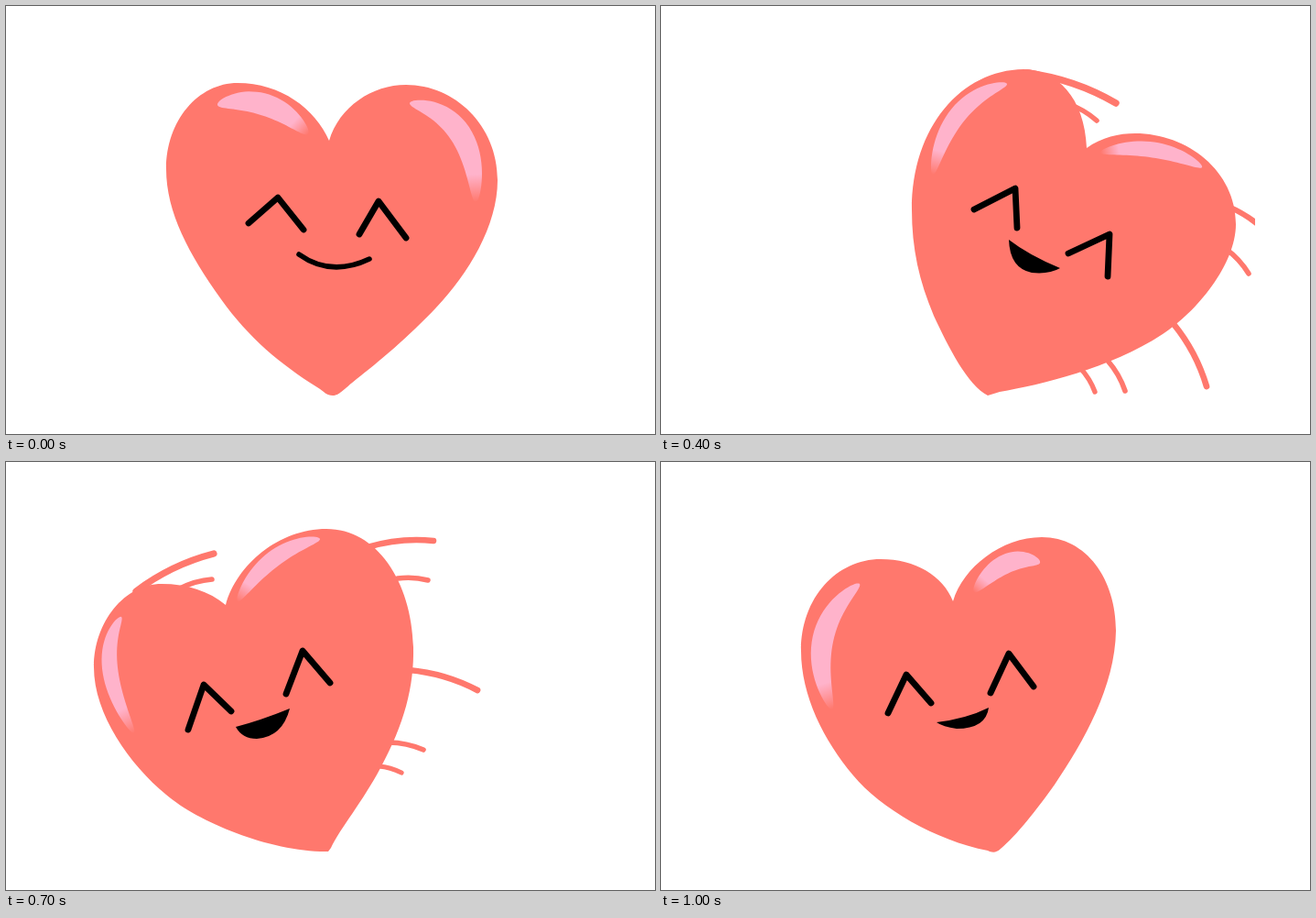
An HTML page with a canvas that plays this animation: 709 px wide and 467 px high, repeating every 1.1 s.

```html
<!DOCTYPE html>
<html lang="en">
<head>
<meta charset="utf-8">
<title>Swaying heart</title>
<style>
html, body { margin: 0; width: 100%; height: 100%; overflow: hidden; background: #fff; }
canvas { display: block; }
</style>
</head>
<body>
<canvas id="stage" width="709" height="467"></canvas>
<script>
const ctx = document.getElementById('stage').getContext('2d');
const RED = '#ff786d', PINK = '#ffb3cb', INK = '#000';
const STEP = 100;
const BEND = 0.1;

// shines: start, control, end, width. lines: the two ends of each speed line.
const front = {
  body: 'M353 147C364 110 400 86 437 86C490 86 537 130 537 190C537 240 505 292 470 329' +
    'C440 361 405 390 383 407C368 419 364 425 357 425C350 425 348 421 340 416' +
    'C300 391 265 362 235 320C200 271 175 225 175 178C175 125 210 84 253 84C300 84 338 112 353 147',
  shines: [[231, 108, 287, 92, 330, 140, 24], [441, 106, 515, 118, 513, 214, 24]],
  eyes: 'M265 237L297 209L325 244M386 249L407 213L437 253',
  smile: 'M320 271Q355 296 397 276'
};

const lean = {
  body: 'M319 152C330 115 372 82 416 82C465 82 497 128 497 184C496 245 462 305 430 352' +
    'C410 380 388 408 371 422C366 427 361 426 357 424C300 413 240 378 210 342' +
    'C178 304 153 255 153 206C153 148 192 106 240 106C278 106 308 124 319 152',
  shines: [[217, 133, 152, 184, 187, 270, 23], [414, 110, 376, 96, 342, 142, 21]],
  eyes: 'M248 274L268 232L295 263M360 252L380 209L407 245',
  mouth: 'M301 284Q334 280 358 268Q355 291 323 291Q308 289 301 284'
};

const tilt = {
  body: 'M470 156C488 141 512 133 540 133C580 133 614 174 614 224C614 275 575 330 535 363' +
    'C500 393 420 426 358 425L355 421C345 400 320 370 301 334C275 286 264 245 265 202' +
    'C267 130 305 73 360 73C412 73 458 112 470 156',
  shines: [[367, 84, 424, 94, 457, 152, 18], [584, 169, 616, 217, 570, 296, 17]],
  eyes: 'M356 241L386 206L404 253M464 272L494 243L511 292',
  mouth: 'M400 269Q432 282 459 289Q452 302 436 302Q408 300 400 269',
  lines: [
    [243, 86, 315, 93], [249, 129, 282, 127], [195, 249, 270, 227], [254, 314, 292, 306],
    [278, 339, 303, 332], [483, 100, 568, 141], [485, 128, 520, 138]
  ]
};

const sway = {
  body: 'M465 155C482 143 500 139 518 139C575 139 628 180 628 238C628 282 585 334 548 358' +
    'C490 396 415 413 370 421L357 425C335 414 314 372 298 338C282 300 274 265 274 222' +
    'C274 132 328 70 396 69C432 69 463 100 465 155',
  shines: [[378, 85, 312, 102, 297, 184, 19], [591, 176, 540, 146, 480, 160, 17]],
  eyes: 'M342 222L387 199L389 242M445 270L490 249L488 295',
  mouth: 'M380 255Q402 272 436 286Q424 293 405 291Q381 286 380 255',
  lines: [
    [400, 73, 497, 106], [445, 107, 476, 125], [620, 219, 665, 250], [617, 265, 642, 292],
    [560, 347, 596, 415], [458, 395, 474, 421], [488, 387, 507, 420]
  ]
};

// Pose, sum of an x and its mirrored x (0 = not mirrored), speed lines shown
const steps = [
  [front, 0], [lean, 710], [tilt, 0, true], [sway, 0], [sway, 0, true], [lean, 0],
  [front, 0], [tilt, 710, true], [sway, 712], [sway, 712, true], [lean, 0]
];

function fill(path, color) {
  ctx.fillStyle = color;
  ctx.fill(new Path2D(path));
}

function stroke(path, color, width) {
  ctx.strokeStyle = color;
  ctx.lineWidth = width;
  ctx.stroke(new Path2D(path));
}

function speedLine([x0, y0, x1, y1]) {
  const dx = x1 - x0, dy = y1 - y0;
  const cx = (x0 + x1) / 2 + dy * BEND, cy = (y0 + y1) / 2 - dx * BEND;
  stroke(`M${x0} ${y0}Q${cx} ${cy} ${x1} ${y1}`, RED, 4.5 + Math.hypot(dx, dy) / 35);
}

// A ribbon along a quadratic curve, widest in the middle and fading out at its end.
function shine([x0, y0, cx, cy, x1, y1, width]) {
  const quad = (a, c, b, t) => (1 - t) ** 2 * a + 2 * t * (1 - t) * c + t * t * b;
  const slope = (a, c, b, t) => (1 - t) * (c - a) + t * (b - c);
  const edge = (t, side) => {
    const dx = slope(x0, cx, x1, t), dy = slope(y0, cy, y1, t);
    const k = side * width / 2 * Math.sin(Math.PI * t) ** 0.5 / Math.hypot(dx, dy);
    return [quad(x0, cx, x1, t) - dy * k, quad(y0, cy, y1, t) + dx * k];
  };
  const ts = Array.from({ length: 41 }, (_, i) => (1 - Math.cos(Math.PI * i / 40)) / 2);
  const outline = [...ts.map(t => edge(t, 1)), ...ts.reverse().map(t => edge(t, -1))];
  const fade = ctx.createLinearGradient(x1, y1, quad(x0, cx, x1, 0.83), quad(y0, cy, y1, 0.83));
  fade.addColorStop(0, PINK + '00');
  fade.addColorStop(1, PINK);
  fill('M' + outline.map(p => p.map(v => v.toFixed(2)).join(' ')).join('L') + 'Z', fade);
}

function draw([pose, flip, moving]) {
  ctx.setTransform(1, 0, 0, 1, 0, 0);
  ctx.clearRect(0, 0, 709, 467);
  if (flip) ctx.setTransform(-1, 0, 0, 1, flip, 0);
  ctx.lineCap = ctx.lineJoin = 'round';

  if (moving) {
    ctx.save();
    ctx.beginPath();
    ctx.rect(0, 0, 649, 467);
    ctx.clip();
    pose.lines.forEach(speedLine);
    ctx.restore();
  }
  fill(pose.body, RED);
  pose.shines.forEach(shine);
  stroke(pose.eyes, INK, 6.8);
  if (pose.smile) stroke(pose.smile, INK, 5.5);
  if (pose.mouth) fill(pose.mouth, INK);
}

function tick() {
  draw(steps[Math.floor(performance.now() / STEP) % steps.length]);
  requestAnimationFrame(tick);
}
tick();
</script>
</body>
</html>
```
